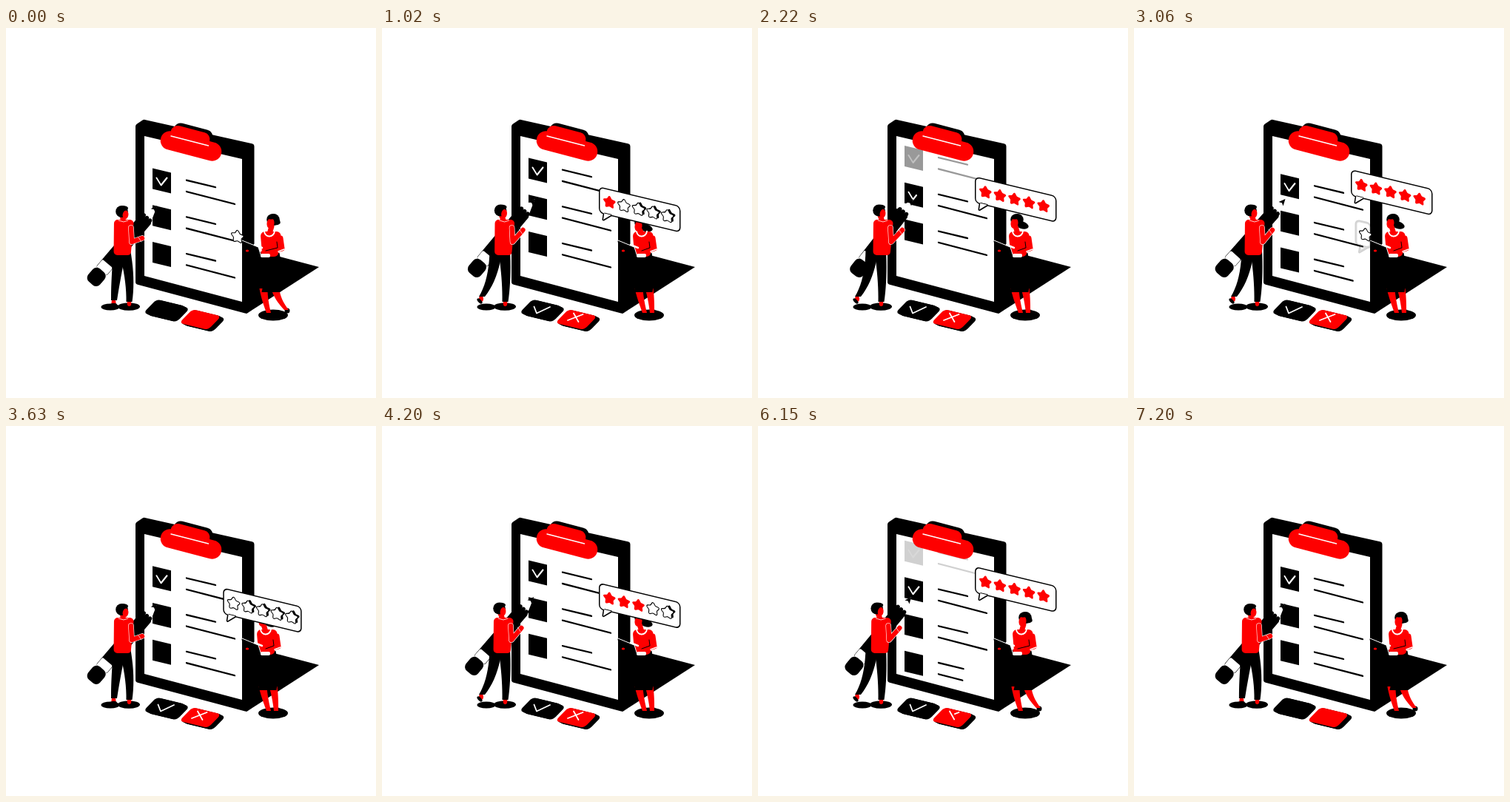
Recreate the animation shown at these times as an HTML page with a canvas. Size 500 by 500 pixels, loop 7.23 s.

```html
<!DOCTYPE html>
<html lang="en">
<head>
<meta charset="utf-8">
<title>Checklist and rating</title>
<style>
html, body { margin: 0; width: 100%; height: 100%; overflow: hidden; background: #fff; }
canvas { display: block; width: 500px; height: 500px; }
</style>
</head>
<body>
<canvas id="stage" width="500" height="500"></canvas>
<script>
const ctx = document.getElementById('stage').getContext('2d');
const BLACK = '#000', RED = '#fe0000', WHITE = '#fff';
const LOOP = 7230, CYCLE = LOOP / 2, STEP = 30, PITCH = 49.7, SLOPE = .24;

const clamp = v => Math.max(0, Math.min(1, v));
const ramp = (t, a, b) => clamp((t - a) / (b - a));
const ease = (t, a, b) => { const v = ramp(t, a, b); return v * v * (3 - 2 * v); };
const mix = (a, b, k) => a + (b - a) * k;

// Closed polygon from flat x, y points with rounded corners.
function shape(p, color, r = 0) {
  const n = p.length;
  ctx.beginPath();
  ctx.moveTo((p[n - 2] + p[0]) / 2, (p[n - 1] + p[1]) / 2);
  for (let i = 0; i < n; i += 2) {
    const j = (i + 2) % n;
    ctx.arcTo(p[i], p[i + 1], (p[i] + p[j]) / 2, (p[i + 1] + p[j + 1]) / 2, r);
  }
  ctx.closePath();
  ctx.fillStyle = color;
  ctx.fill();
}

function oval(x, y, rx, ry, color, turn = 0) {
  ctx.beginPath();
  ctx.ellipse(x, y, rx, ry, turn, 0, 7);
  ctx.fillStyle = color;
  ctx.fill();
}

function box(x, y, w, h, color, r = 0) {
  ctx.beginPath();
  ctx.roundRect(x, y, w, h, r);
  ctx.fillStyle = color;
  ctx.fill();
}

// Strokes the first part of a polyline.
function line(p, color, width, part = 1) {
  if (part <= 0) return;
  const step = i => Math.hypot(p[i + 2] - p[i], p[i + 3] - p[i + 1]);
  let left = 0;
  for (let i = 0; i < p.length - 2; i += 2) left += step(i) * part;
  ctx.beginPath();
  ctx.moveTo(p[0], p[1]);
  for (let i = 0; i < p.length - 2 && left > 0; i += 2) {
    const d = step(i), k = Math.min(1, left / d);
    ctx.lineTo(mix(p[i], p[i + 2], k), mix(p[i + 1], p[i + 3], k));
    left -= d;
  }
  ctx.strokeStyle = color;
  ctx.lineWidth = width;
  ctx.stroke();
}

// Tapered, bent limb: top, bend and end points, width at both ends.
function limb(x0, y0, x1, y1, x2, y2, w0, w1, color) {
  const near = [], far = [];
  for (let i = 0; i <= 10; i++) {
    const k = i / 10, w = mix(w0, w1, k) / 2;
    const x = mix(mix(x0, x1, k), mix(x1, x2, k), k);
    const y = mix(mix(y0, y1, k), mix(y1, y2, k), k);
    near.push(x - w, y);
    far.unshift(x + w, y);
  }
  shape([...near, ...far], color);
}

const trunk = (x0, y0, w0, x1, y1, w1, r) =>
  shape([x0 - w0 / 2, y0, x0 + w0 / 2, y0, x1 + w1 / 2, y1, x1 - w1 / 2, y1], RED, r);

// Runs a drawing in slanted coordinates.
function slant(x, y, draw, cx = 0, cy = 1) {
  ctx.save();
  ctx.transform(1, SLOPE, cx, cy, x, y);
  draw();
  ctx.restore();
}

function board() {
  shape([325, 298, 370, 309, 423, 323, 325, 386], BLACK);
  shape([175, 131, 186, 123.5, 335.5, 157, 335.5, 378, 325, 386, 175, 346], BLACK, 4);
  shape([187, 146, 319, 177, 319, 370, 187, 335], WHITE);
}

function row(y, check, upper, lower, alpha) {
  ctx.globalAlpha = alpha;
  slant(198, y, () => {
    box(0, 0, 25, 28, BLACK);
    line([5.5, 11.7, 11.5, 20.2, 19.5, 8.3], WHITE, 2, check);
    line([46, 5.2, 85, 5.2], BLACK, 2.3, upper);
    line([46, 20.5, 111, 21.8], BLACK, 2.3, lower);
  });
  ctx.globalAlpha = 1;
}

function list(p) {
  const y = i => 189.5 + PITCH * (i - p / CYCLE);
  const grow = ramp(p, 2200, 3560);
  row(y(0), 1, 1, 1, 1 - ramp(p, 1350, 2800));
  row(y(1), ramp(p, 1920, 2320), 1, 1, 1);
  row(y(2), 0, 1, 1, 1);
  row(y(3), 0, clamp(grow * 3.5), Math.sqrt(grow), ramp(p, 2230, 2480));
}

function clip() {
  line([236, 138, 270, 147], BLACK, 19);
  line([234, 150, 274, 159], BLACK, 19);
  line([232, 141.5, 266, 150.5], RED, 19);
  line([221.5, 152, 278.5, 167], RED, 25.5);
  line([223, 146, 273.5, 159], WHITE, 1.5);
}

function tile(x, y, color) {
  const face = (dx, dy, c) => slant(x + dx, y + dy, () => box(-19.5, -10, 39, 20, c, 5), -.9, .92);
  for (let i = 1; i <= 6; i++) face(i, i / 2, BLACK);
  face(0, 0, color);
}

function tiles(t) {
  const check = ramp(t, 250, 650) - ramp(t, 6300, 6750);
  const cross = ramp(t, 500, 900) - ramp(t, 5950, 6500);
  tile(214, 380.5, BLACK);
  tile(262.5, 394, RED);
  line([205.5, 376.5, 209, 385.5, 227, 377], WHITE, 1.8, check);
  line([259, 385.5, 265.5, 397], WHITE, 1.8, clamp(cross * 1.5));
  line([271.5, 387, 251, 395], WHITE, 1.8, clamp(cross * 2 - 1));
}

function pencil(ex, ey, tx, ty) {
  ctx.save();
  ctx.translate(ex, ey);
  ctx.rotate(Math.atan2(ty - ey, tx - ex));
  const end = Math.hypot(tx - ex, ty - ey), neck = end - 23;
  box(10, -9.5, neck - 10, 19, BLACK, 2);
  box(10, -9, 13, 18, WHITE, 2);
  box(-12, -10.5, 23, 21, BLACK, 7);
  shape([neck, -8, end, 0, neck, 8], WHITE);
  for (const y of [-5.5, 0, 5.5]) oval(neck, y, 4, 3, BLACK);
  shape([end - 9, -4, end, 0, end - 9, 4, end - 7, 0], BLACK);
  ctx.restore();
}

function man(p) {
  const stride = ease(p, 0, 585) - ease(p, 3060, CYCLE);
  const reach = ease(p, 0, 2250) - ease(p, 2250, 2850);
  const x = 152 + 4 * stride + 6 * reach;
  const hx = 157 + stride + 6 * reach, hy = 248 - 1.5 * stride;
  const ax = 184 + 3 * stride + 8 * reach, ay = 284 - 11 * stride;

  pencil(122.5 + 14.5 * reach, 336 - 12 * stride, 204.5 + 5 * reach, 240 - 9 * stride);
  oval(141, 377, 12.5, 4.5, BLACK);
  oval(166, 376.5, 15, 5.3, BLACK);

  const fx = mix(145.5, 134, stride), fy = mix(371, 366, stride);
  oval(fx, fy, 3, 4, RED);
  oval(fx - 2 * stride, fy + 3, 4.5, 2.2, BLACK, .8 * stride);
  oval(166.5, 372, 2.8, 4, RED);
  limb(154, 300, mix(148, 151, stride), 340, mix(146, 135, stride), mix(368, 363, stride), 17, 8, BLACK);
  limb(mix(160, 165, stride), 300, 169, 338, 166.5, 370, 16, 8, BLACK);

  line([hx, hy + 4, x + 7, 264], RED, 7);
  trunk(x + 7.5, 259, 27, x + 5, 307, 23, 5);
  line([x, 260, x + 7, 262, x + 13, 260], WHITE, .8);
  const arm = [x + 17, 270, x + 18, 289, ax, ay];
  line(arm, WHITE, 7.6);
  line(arm, RED, 6.4);
  line([ax - 5, ay - 1, ax - 1, ay + 5], WHITE, .7);

  oval(hx - .5, hy, 8.3, 8, BLACK);
  oval(hx + 4.5, hy + 4.5, 3.9, 6, RED, .15);
  oval(hx + 2, hy - 4.5, 6, 3.2, BLACK);
}

function woman(t) {
  const k = ease(t, 150, 800) - ease(t, 5250, 5900);
  const to = (a, b) => mix(a, b, k);
  const hx = to(360, 349), hy = 261 + 4 * k * (1 - ramp(t, 1000, 1700));
  const x = to(358, 353);

  oval(361, 388, 20, 7.5, BLACK);
  oval(to(380, 365), 382, 3.5, 3.5, BLACK);
  limb(to(348, 347), 352, 349, 366, 355, 385, 11, 6, RED);
  limb(to(364, 361), 352, to(366, 364), 366, to(379, 365), to(381, 385), 11, 6, RED);
  limb(x + 1, 304, x + 5, 330, x, 357, 21, 25, BLACK);

  oval(hx + to(3, 7), hy + to(0, 5), to(8, 10), 5, BLACK, .3);
  line([hx - 1, hy + 7, x - 2, 278], RED, 7);
  trunk(x, 275, 29, x - 1, 309, 21, 6);
  ctx.beginPath();
  ctx.ellipse(x - 2, 274, 7, 7.5, 0, .1, Math.PI - .1);
  ctx.strokeStyle = WHITE;
  ctx.lineWidth = 2;
  ctx.stroke();
  oval(hx + 1, hy - 2, 8.8, 8, BLACK);
  oval(hx - 2.5, hy + 3, 5, 7.2, RED, .15);
  oval(hx, hy - 6, 7, 3.2, BLACK, -.2);

  line([x + 13, 284, x + 15, 298, 348, 304], RED, 7);
  line([x + 8, 289, x + 9, 297, 351, 301], BLACK, 1);
  line([x + 10, 302, x + 18, 299], WHITE, 1.5);
  box(344, 305, 13, 5, WHITE, 2);
  shape([318, 286.5, 341, 296, 345, 309, 322, 301], BLACK, 1);
  line([319, 287, 341, 296, 345, 309], WHITE, 1);
  line([336, 293, 346, 297], WHITE, 2.5);
  oval(326, 301, 2.2, 1.6, RED);
}

function star(x, y, fill, shade) {
  const pts = (dx, dy) => Array.from({ length: 10 }, (_, i) => {
    const a = (i / 5 - .5) * Math.PI, r = i % 2 ? 5.6 : 10;
    return [x + dx + Math.cos(a) * r, y + dy + Math.sin(a) * r];
  }).flat();
  if (shade) shape(pts(2.5, -1.5), BLACK, 1.5);
  shape(pts(0, 0), fill, 1.5);
  if (fill === WHITE) {
    ctx.strokeStyle = BLACK;
    ctx.lineWidth = 1.1;
    ctx.stroke();
  }
}

function bubble(age) {
  if (age < 0 || age > 3450) return;
  const open = ease(age, 60, 750), fade = 1 - ramp(age, 3220, 3450);
  const w = mix(19, 107.5, open), lit = Math.floor((age - 900) / 110);
  const y = 227.5 - .0113 * age + 35 * (1 - ease(age, 0, 700));
  slant(mix(300, 294.5, open), y, () => {
    ctx.globalAlpha = fade * ramp(age, 10, 450);
    ctx.beginPath();
    ctx.roundRect(0, 0, w, 33, 5);
    ctx.moveTo(6, 32);
    ctx.lineTo(4.5, 42);
    ctx.lineTo(16.5, 32);
    ctx.strokeStyle = BLACK;
    ctx.lineWidth = 3;
    ctx.stroke();
    ctx.fillStyle = WHITE;
    ctx.fill();
    ctx.globalAlpha = fade;
    for (let i = 0; i < 5 && (!i || w > 20 * i + 20); i++)
      star(12.8 + 19.6 * i, 16.5, i < lit ? RED : WHITE, i > Math.max(lit, 0));
  });
  ctx.globalAlpha = 1;
}

function draw(now) {
  const t = Math.floor((now % LOOP) / STEP) * STEP, p = t % CYCLE;
  ctx.fillStyle = WHITE;
  ctx.fillRect(0, 0, 500, 500);
  ctx.lineCap = ctx.lineJoin = 'round';
  board();
  list(p);
  clip();
  tiles(t);
  man(p);
  woman(t);
  bubble(t);
  bubble(t - 2970);
}

let start;
function tick(now) {
  if (start === undefined) start = now;
  draw(now - start);
  requestAnimationFrame(tick);
}
draw(0);
requestAnimationFrame(tick);
</script>
</body>
</html>
```
